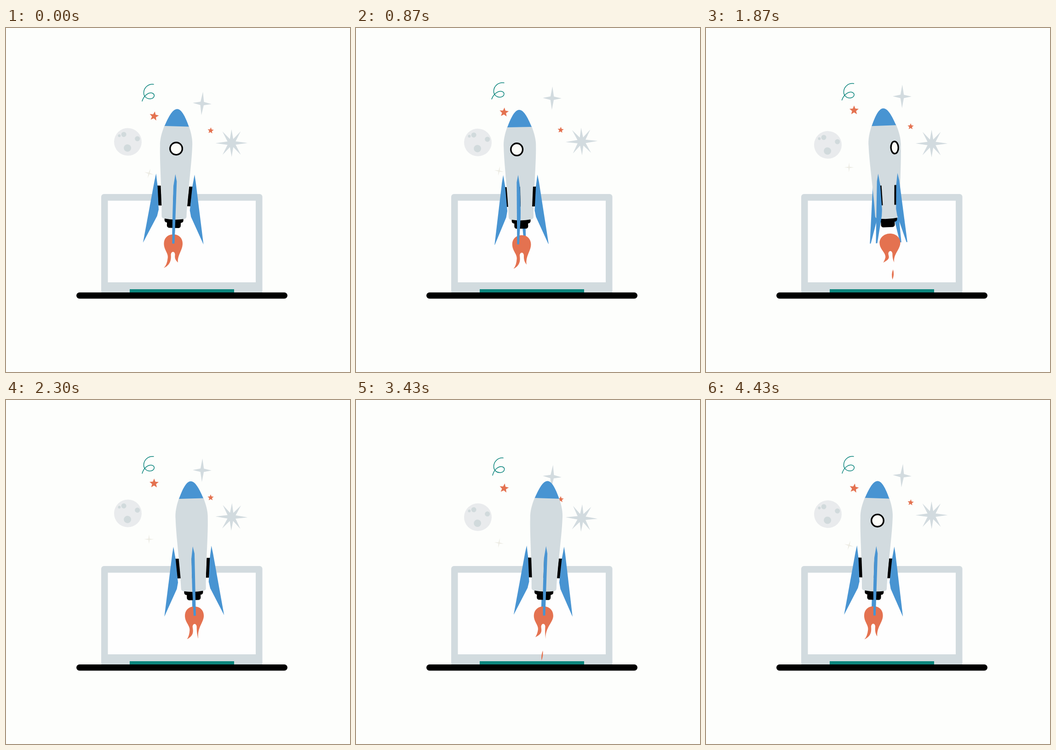
An HTML page with a canvas that plays this animation: 748 px wide and 748 px high, repeating every 4.46 s.

```html
<!DOCTYPE html>
<html lang="en">
<head>
<meta charset="utf-8">
<title>Rocket launch</title>
<style>
html, body { margin: 0; width: 100%; height: 100%; overflow: hidden; background: #fdfefc; }
canvas { display: block; width: 100vw; height: 100vh; }
</style>
</head>
<body>
<canvas id="stage" width="748" height="748"></canvas>
<script>
const ctx = document.getElementById('stage').getContext('2d');
const LOOP = 4460;
const BURN = LOOP / 15;
const TAU = Math.PI * 2;
const color = {
  back: '#fdfefc', grey: '#d2dbdf', blue: '#4894d2', orange: '#e47250',
  teal: '#0c857d', moon: '#e9ebed', crater: '#d1dadc', spark: '#ecebe3'
};

const lerp = (a, b, k) => a + (b - a) * k;
const mod = (a, n) => (a % n + n) % n;
const wave = (t, peak, period = LOOP) => Math.cos(TAU * (t - peak) / period);
const swing = (t, start) => Math.sin(TAU * (t - start) / LOOP);

const rocketX = t => 386 - 29.5 * wave(t, 704) + 3.3 * wave(t, 500, LOOP / 3);
const rocketY = t => 318 + 2 * wave(t, 600, LOOP / 2);
const tilt = t => 2.4 * wave(t, 3900);

// Turn about the long axis in quarter turns: slow one way, quick back.
function spin(t) {
  const phase = TAU * (t - 923) / LOOP + .65 * swing(t, 3950) + .2 * wave(t, 50, LOOP / 2);
  return .92 - 1.17 * Math.cos(phase);
}

function fillPoly(points, fill) {
  ctx.fillStyle = fill;
  ctx.beginPath();
  points.forEach(([x, y]) => ctx.lineTo(x, y));
  ctx.closePath();
  ctx.fill();
}

function box(x, y, w, h, r, fill) {
  ctx.fillStyle = fill;
  ctx.beginPath();
  ctx.roundRect(x, y, w, h, r);
  ctx.fill();
}

function disc(x, y, r, fill) {
  ctx.fillStyle = fill;
  ctx.beginPath();
  ctx.arc(x, y, r, 0, TAU);
  ctx.fill();
}

function place(x, y, degrees, draw) {
  ctx.save();
  ctx.translate(x, y);
  ctx.rotate(degrees * TAU / 360);
  draw();
  ctx.restore();
}

// Star with evenly spread arms; reach(i) gives the x and y radius of arm i.
function star(count, reach, waist, fill) {
  const points = [];
  for (let i = 0; i < count; i++) {
    const a = TAU * i / count - TAU / 4, b = a + TAU / count / 2;
    const [rx, ry] = reach(i);
    points.push([rx * Math.cos(a), ry * Math.sin(a)], [waist * Math.cos(b), waist * Math.sin(b)]);
  }
  fillPoly(points, fill);
}

function drawSquiggle() {
  ctx.strokeStyle = color.teal;
  ctx.lineWidth = 1.5;
  ctx.lineCap = 'round';
  ctx.beginPath();
  ctx.moveTo(11, -17.5);
  ctx.bezierCurveTo(-2, -19, -10, -9, -10.5, 0);
  ctx.bezierCurveTo(-11, 9, -4, 14.5, 4, 14);
  ctx.bezierCurveTo(13, 13, 14.5, 5, 9, 2);
  ctx.bezierCurveTo(1, -1.5, -10, 6, -14, 19);
  ctx.stroke();
}

function drawMoon() {
  disc(0, 0, 30, color.moon);
  disc(-9.3, -16, 5.5, color.crater);
  disc(-19, -13, 3, color.crater);
  disc(20.5, -7.5, 5.5, color.crater);
  disc(-.5, 13.3, 8, color.crater);
}

function drawSky(t) {
  place(310, 140 - 4 * swing(t, 0), 3 * swing(t, 0), drawSquiggle);
  place(265, 250.5 - 6.7 * wave(t, 400, LOOP / 2), 1.5, drawMoon);
  place(322, 186.3 - 7.5 * wave(t, 1700), 5 - 5 * wave(t, 1900),
    () => star(5, () => [10.5, 10.5], 4.6, color.orange));
  place(445, 217.8 + 5.8 * wave(t, 300), 3 + 3 * wave(t, 300),
    () => star(5, () => [7, 7], 3.1, color.orange));
  place(426.5, 158 - 10 * wave(t, 1580), 2.5 - 2 * wave(t, 1580),
    () => star(4, () => [20.5, 25.5], 5.2, color.grey));
  place(490.5, 252 - 5.2 * wave(t, 870), .5 - 2.5 * wave(t, 870),
    () => star(8, i => i % 2 ? [28, 36] : [35, 30], 9.5, color.grey));
  place(311, 309.4 + 6.8 * wave(t, -80), 8 + 8 * wave(t, 0),
    () => star(4, () => [10.5, 10.5], 1.8, color.spark));
}

function drawLaptop() {
  box(207, 361, 350.5, 218, 6, color.grey);
  box(221.5, 375.5, 321.5, 177.5, 0, '#fefefe');
  box(269, 568, 227, 8, 0, color.teal);
  box(153, 575, 459, 13.5, 6.75, '#000');
}

// Outline points: x seen from the side, x seen edge-on, y.
const fin = [
  [42, 0, 320], [38, -3.5, 346], [34, -3.5, 398], [37, -3.5, 412],
  [66, -2.5, 471], [66, 2.5, 471], [45, 3.5, 336]
];
const strut = [[39, 2, 346], [31, -3, 346], [28, -3, 389], [35, 2, 389]];

function drawFin(u) {
  const side = Math.sign(u), k = Math.abs(u);
  const eased = lerp(k, k * k * (3 - 2 * k), .5);
  const shape = points => points.map(([wide, thin, y]) => [side * lerp(thin, wide, eased), y]);
  fillPoly(shape(strut), '#000');
  fillPoly(shape(fin), color.blue);
}

// age runs from 0 to 1 between two drops breaking off the tail.
function drawFlame(age) {
  const fresh = (1 - age) ** 3, arch = Math.sin(Math.PI * age);
  const c = 5 * fresh, h = 20.3 + 4 * fresh;
  const lx = -12 - 8 * age, ly = 505 + 21 * Math.sqrt(age);
  const rx = 14 - 7 * arch, ry = 506 + 16 * arch;
  ctx.fillStyle = color.orange;
  ctx.beginPath();
  ctx.moveTo(c, 451);
  ctx.bezierCurveTo(c - 13, 451, c - h, 460, c - h, 471);
  ctx.bezierCurveTo(c - h, 485, c - 10, 492, c - 11, 502);
  ctx.quadraticCurveTo(c - 12, ly - 7, lx, ly);
  ctx.bezierCurveTo(lx + 17, ly - 8, c - 4, 502, c - 4.5, 495);
  ctx.bezierCurveTo(c - 4, 487, c + 4, 487, c + 4.5, 495);
  ctx.bezierCurveTo(c + 4, 503, c + 5, ry - 6, rx, ry);
  ctx.bezierCurveTo(rx - 2, 496, c + h, 486, c + h, 471);
  ctx.bezierCurveTo(c + h, 460, c + 13, 451, c, 451);
  ctx.fill();

  if (age < .6) {
    const x = 10 - 22 * age, y = 528 + 72 * age, w = 4.8 - 4.6 * age;
    ctx.beginPath();
    ctx.moveTo(x + 1, y - 11);
    ctx.quadraticCurveTo(x + w, y, x - 1, y + 11);
    ctx.quadraticCurveTo(x - w, y, x + 1, y - 11);
    ctx.fill();
  }
}

function drawBody() {
  box(-20.5, 414, 41, 11.5, [0, 0, 5, 5], '#000');
  box(-15, 424, 30, 13, [0, 0, 5, 5], '#000');

  ctx.fillStyle = color.grey;
  ctx.beginPath();
  ctx.moveTo(-26.5, 215);
  ctx.bezierCurveTo(-32, 230, -36, 245, -35, 260);
  ctx.bezierCurveTo(-35, 295, -28, 360, -27, 412);
  ctx.quadraticCurveTo(-27, 416, -22, 417);
  ctx.quadraticCurveTo(0, 421, 22, 417);
  ctx.quadraticCurveTo(27, 416, 27, 412);
  ctx.bezierCurveTo(28, 360, 35, 295, 35, 260);
  ctx.bezierCurveTo(36, 245, 32, 230, 26.5, 215);
  ctx.fill();

  ctx.fillStyle = color.blue;
  ctx.beginPath();
  ctx.moveTo(-26.5, 216);
  ctx.bezierCurveTo(-20, 200, -11, 178.5, 0, 178.5);
  ctx.bezierCurveTo(11, 178.5, 20, 200, 26.5, 216);
  ctx.fill();
}

function drawWindow(turn) {
  if (Math.abs(turn) >= 1) return;
  const a = turn * TAU / 4;
  ctx.fillStyle = '#fdfdf9';
  ctx.strokeStyle = '#000';
  ctx.lineWidth = 3.4;
  ctx.beginPath();
  ctx.ellipse(27 * Math.sin(a), 264.5, 13.3 * Math.cos(a), 13.3, 0, 0, TAU);
  ctx.fill();
  ctx.stroke();
}

function drawRocket(t) {
  const turn = spin(t), front = [], rear = [];
  for (let i = 0; i < 4; i++) {
    const a = mod(turn + i + 2, 4) - 2;
    if (Math.abs(a) <= 1) front.push(a);
    else rear.push(Math.sign(a) * 2 - a);
  }
  place(rocketX(t), rocketY(t), tilt(t), () => {
    ctx.translate(0, -320);
    rear.forEach(drawFin);
    drawFlame(mod(t / BURN - .12, 1));
    drawBody();
    drawWindow(turn);
    front.forEach(drawFin);
  });
}

function frame(now) {
  const t = now % LOOP;
  ctx.fillStyle = color.back;
  ctx.fillRect(0, 0, 748, 748);
  drawSky(t);
  drawLaptop();
  drawRocket(t);
}

let start;
function tick(now) {
  start ??= now;
  frame(now - start);
  requestAnimationFrame(tick);
}
frame(0);
requestAnimationFrame(tick);
</script>
</body>
</html>
```
